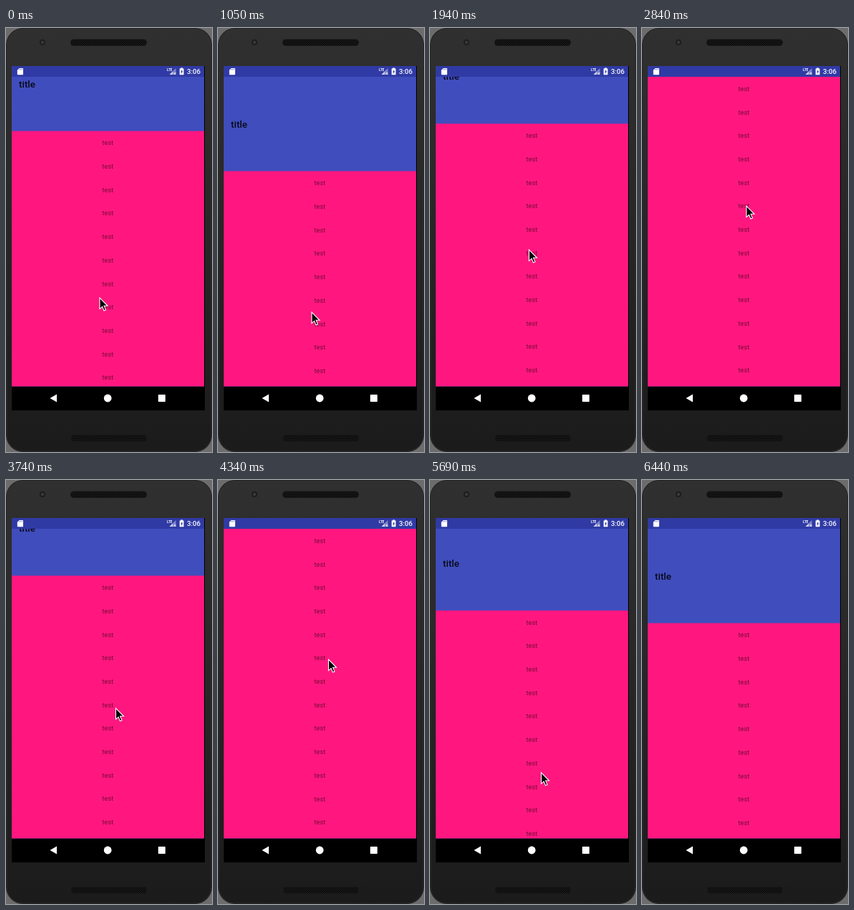
Animation of 288x591 px, one loop 6.89 s. Source, as an HTML page:

```html
<!DOCTYPE html>
<html lang="en">
<head>
<meta charset="utf-8">
<title>Collapsing header</title>
<style>
  html, body { margin: 0; width: 100%; height: 100%; overflow: hidden; background: #6c6c6c; }
  svg { display: block; width: 100%; height: 100%; }
  text { font-family: Roboto, "Noto Sans", sans-serif; }
  .title { font-size: 13.4px; font-weight: 500; fill: #000; fill-opacity: .87; }
  .row { font-size: 9.2px; fill: #000; fill-opacity: .54; text-anchor: middle; }
  .clock { font-size: 9.6px; font-weight: 500; fill: #fff; }
  .lte { font-size: 4.6px; font-weight: 700; fill: #fff; }
  .bar { fill: #303aa5; }
</style>
</head>
<body>
<svg viewBox="0 0 288 591" preserveAspectRatio="none">
  <defs>
    <linearGradient id="shell" x1="0" y1="0" x2="0" y2="1">
      <stop offset="0" stop-color="#303030"/>
      <stop offset=".5" stop-color="#262626"/>
      <stop offset="1" stop-color="#1b1b1b"/>
    </linearGradient>
    <pattern id="mesh" width="3" height="3" patternUnits="userSpaceOnUse">
      <rect width="3" height="3" fill="#0c0c0c"/>
      <rect width="1" height="1" fill="#252525"/>
      <rect x="1.5" y="1.5" width="1" height="1" fill="#252525"/>
    </pattern>
    <clipPath id="view"><rect x="8" y="68" width="269" height="431.6"/></clipPath>
  </defs>

  <!-- phone -->
  <rect width="288" height="591" rx="24" fill="#151515"/>
  <rect x="1" y="1" width="286" height="589" rx="23" fill="url(#shell)" stroke="#333" stroke-width=".8"/>
  <circle cx="51" cy="20" r="5" fill="#1f1f1f" stroke="#343434"/>
  <circle cx="51" cy="20" r="2" fill="#3b3b3b"/>
  <g fill="url(#mesh)" stroke="#171717">
    <rect x="90.5" y="16" width="106" height="8.5" rx="4"/>
    <rect x="91.5" y="567.5" width="105" height="8.5" rx="3"/>
  </g>

  <!-- screen -->
  <rect x="8" y="53" width="270" height="480"/>
  <rect class="bar" x="8" y="53" width="269" height="15"/>
  <g clip-path="url(#view)">
    <rect x="8" y="68" width="269" height="432" fill="#404dbd"/>
    <g id="sheet">
      <text class="title" x="18" y="-61">title</text>
      <rect x="8" width="269" height="440" fill="#ff177f"/>
    </g>
  </g>

  <!-- status bar -->
  <path d="M18.6 56H23.2q.8 0 .8.8V64.4q0 .8-.8.8H16.6q-.8 0-.8-.8V58.8z" fill="#fff"/>
  <path class="bar" d="M18.4 57h.7v1.6h-.7zM20.2 57h.7v1.6h-.7zM22 57h.7v1.6h-.7z"/>
  <text class="lte" x="225" y="59.6">LTE</text>
  <path d="M237.5 56V65H228.5z" fill="#fff" fill-opacity=".4"/>
  <path d="M233 60.5V65H228.5z" fill="#fff" fill-opacity=".6"/>
  <path d="M234.5 62l3 3m0-3l-3 3" stroke="#fff" stroke-width=".9"/>
  <path d="M244.3 56.5V55.6H247V56.5H248.5V65.2H242.7V56.5z" fill="#fff"/>
  <path class="bar" d="M246.2 57.7L244.2 61.4H245.3V64L247.2 60.3H246.2z"/>
  <text class="clock" x="253" y="64.4">3:06</text>

  <!-- navigation bar -->
  <g fill="#fff">
    <path d="M61.5 516L71 510.5V521.5z"/>
    <circle cx="142.2" cy="516" r="5.4"/>
    <rect x="212.8" y="511" width="10" height="10" rx=".8"/>
  </g>

  <path id="cursor" d="M0 0V15.6L3.6 12.4L6 18L8.5 16.9L6.1 11.3H11z"
        fill="#000" stroke="#fff" stroke-width="1.1"/>
</svg>

<script>
  const LOOP = 6890, STEP = 150, ROW = 32.7;
  const SHUT = 68, HALF = SHUT + 2 * ROW, OPEN = SHUT + 4 * ROW + .7;
  const sheet = document.getElementById('sheet');
  const cursor = document.getElementById('cursor');

  for (let i = 0; i < 14; i++) {
    const row = document.createElementNS('http://www.w3.org/2000/svg', 'text');
    row.setAttribute('class', 'row');
    row.setAttribute('x', 142.4);
    row.setAttribute('y', 19.8 + i * ROW);
    row.textContent = 'test';
    sheet.append(row);
  }

  // Each gesture: start, end, final list edge, final pointer height.
  const rest = { top: 143.6, y: 376 };
  const gestures = [
    [300, 900, OPEN, 428],
    [900, 1050, OPEN, 396],
    [1050, 1490, 155.3, 334],
    [1490, 1940, HALF, 309],
    [2390, 2690, SHUT, 248],
    [2990, 3740, HALF, 318],
    [3890, 4340, SHUT, 250],
    [4340, 4940, HALF, 355],
    [4940, 5240, 176, 397],
    [5540, 6140, OPEN, 440],
    [6140, 6440, OPEN, 620]
  ];

  const progress = (t, from, to) => Math.min(1, Math.max(0, (t - from) / (to - from)));

  // The picture is refreshed every 150 ms, with one short interval before 1190.
  function tick(t) {
    const base = t < 1190 ? 0 : 1190;
    return base + Math.floor((t - base) / STEP) * STEP;
  }

  function pose(t) {
    let { top, y } = rest;
    for (const [from, to, edge, height] of gestures) {
      const p = progress(t, from, to);
      top += (edge - top) * p;
      y += (height - y) * p;
    }
    // The hand drifts to the right while it swipes.
    const x = 131 + 22.5 * progress(t, 1050, 3740) + 2 * progress(t, 3740, 4940);
    return { top, x, y };
  }

  const start = performance.now();
  function draw() {
    const { top, x, y } = pose(tick((performance.now() - start) % LOOP));
    sheet.setAttribute('transform', `translate(0 ${top})`);
    cursor.setAttribute('transform', `translate(${x} ${y})`);
    requestAnimationFrame(draw);
  }
  draw();
</script>
</body>
</html>
```
